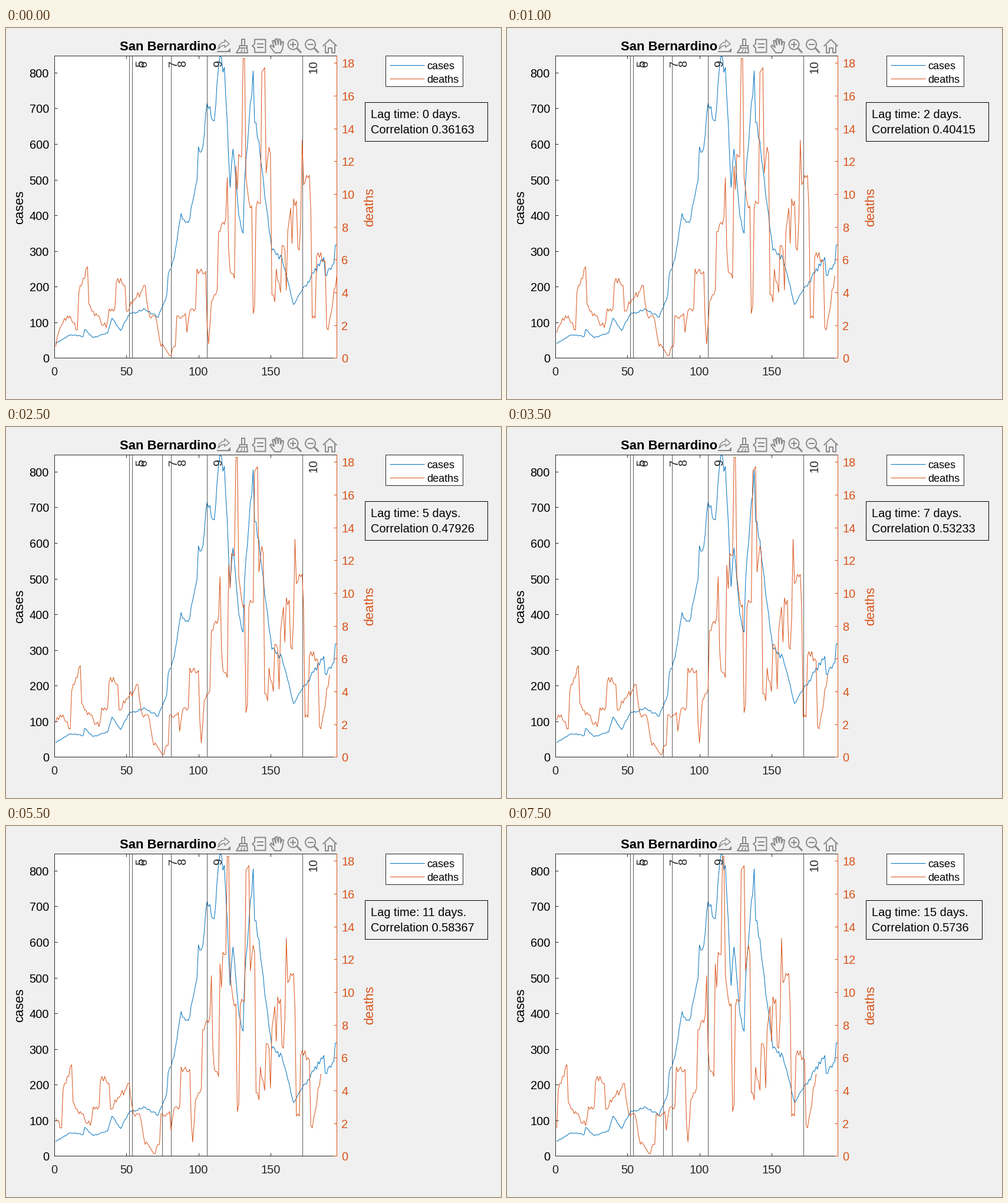
Write a matplotlib script that moves like this. It is 840 px wide and 630 px high and loops after 8000 ms.

```python
import numpy as np
import matplotlib.pyplot as plt
from matplotlib.animation import FuncAnimation
from matplotlib.patches import Circle, Polygon, Rectangle

W, H, DPI = 840, 630, 100
PX = 72 / DPI
DAYS, LAGS = 196, 16
LEFT, TOP, RIGHT, BOTTOM = 82.05, 47.4, 561.27, 560.4
BLUE, ORANGE, DARK, RULE = "#0072bd", "#d95319", "#262626", "#5c5c5c"
BACK, ICON = "#f0f0f0", "#8a8a8a"
CASES_MAX, DEATHS_MAX = 847, 129 / 7

# Turning points by day; seeded wiggles fill the days between.
CASES = {1: 41, 11: 65, 20: 60, 21: 80, 27: 57, 37: 70, 40: 112, 46: 77,
         52: 122, 63: 136, 72: 114, 78: 176, 79: 233, 83: 278, 88: 405,
         93: 380, 99: 497, 100: 592, 103: 590, 106: 715, 111: 665,
         115: 847, 118: 815, 122: 478, 124: 586, 128: 401, 131: 350,
         132: 493, 135: 653, 138: 805, 139: 660, 142: 608, 146: 455,
         151: 302, 158: 278, 166: 150, 187: 282, 188: 232, 194: 265,
         195: 317, 196: 317}
# Weekly death totals: a slow base, plus one-day spikes that each count
# for the seven days they stay in the window.
BASE = {1: 5, 3: 11, 9: 18, 16: 12, 23: 24, 28: 18, 36: 13, 38: 21, 50: 20,
        63: 31, 66: 18, 71: 16, 74: 5, 80: 1, 84: 5, 91: 7, 94: 20, 105: 21,
        107: 6, 109: 24, 119: 38, 122: 10, 126: 7, 128: 39, 132: 36, 136: 20,
        147: 22, 149: 33, 153: 24, 157: 11, 161: 9, 165: 31, 169: 29,
        173: 21, 178: 27, 179: 17, 183: 18, 190: 12, 196: 35}
SPIKES = {17: 15, 43: 12, 85: 12, 99: 16, 114: 22, 120: 27, 126: 48, 131: 44,
          140: 45, 144: 57, 154: 17, 158: 20, 162: 18, 166: 18, 171: 17,
          172: 36, 182: 27}
STAGES = {52: "5", 54: "6", 75: "7", 81: "8", 106: "9", 172: "10"}
CORRELATION = {0: 0.36163, 1: 0.3827, 2: 0.40415, 4: 0.45272, 7: 0.53233,
               9: 0.55839, 11: 0.58367, 13: 0.58816, 15: 0.5736}

plt.rcParams["font.family"] = "Liberation Sans"
rng = np.random.default_rng(4)
days = np.arange(1, DAYS + 1)


def between(keys, x):
    return np.interp(x, list(keys), list(keys.values()))


def wiggle(keys):
    return rng.uniform(-1, 1, DAYS) * ~np.isin(days, list(keys))


cases = between(CASES, days) * (1 + 0.03 * wiggle(CASES))
weekly = between(BASE, days) + 1.5 * wiggle(BASE)
for start, count in SPIKES.items():
    weekly += count * ((days >= start) & (days < start + 7))
deaths = np.clip(np.round(weekly), 1, 129) / 7

fig = plt.figure(figsize=(W / DPI, H / DPI), dpi=DPI, facecolor=BACK)
ax = fig.add_axes([LEFT / W, 1 - BOTTOM / H,
                   (RIGHT - LEFT) / W, (BOTTOM - TOP) / H])
ax2 = ax.twinx()
page = fig.add_axes([0, 0, 1, 1], zorder=5)
page.set(xlim=(0, W), ylim=(H, 0))
page.axis("off")


def label(x, y, s, size=20, color="black", ha="left", **kw):
    return page.text(x, y, s, fontsize=size * PX, color=color, ha=ha,
                     va="baseline", rotation_mode="anchor", **kw)


def stroke(points, width=2, color=ICON):
    page.plot(*zip(*points), color=color, lw=width * PX,
              solid_joinstyle="round", solid_capstyle="butt")


def box(x0, y0, x1, y1, face, edge):
    return page.add_patch(Rectangle((x0, y0), x1 - x0, y1 - y0, fc=face,
                                    ec=edge, lw=PX))


def day_px(d):
    return LEFT + d / DAYS * (RIGHT - LEFT)


def draw_chart():
    ax.set(xlim=(0, DAYS), ylim=(0, CASES_MAX),
           xticks=range(0, 151, 50), yticks=range(0, 801, 100))
    ax2.set(ylim=(0, DEATHS_MAX), yticks=range(0, 19, 2))
    tick = dict(direction="in", length=5 * PX, width=PX,
                labelleft=False, labelright=False, labelbottom=False)
    ax.tick_params(top=True, color=DARK, **tick)
    ax2.tick_params(axis="y", color=ORANGE, **tick)
    for side in ("left", "top", "bottom", "right"):
        ax.spines[side].set(color=DARK, linewidth=PX)
        ax2.spines[side].set(color=ORANGE, linewidth=PX)
        ax2.spines[side].set_visible(side == "right")
    ax.spines["right"].set_visible(False)

    ax.plot(days, cases, color=BLUE, lw=PX)
    for d, name in STAGES.items():
        ax.axvline(d, color=RULE, lw=PX)
        label(day_px(d) + 25, 55, name, color=DARK, ha="right", rotation=90)

    span = BOTTOM - TOP
    for d in range(0, 151, 50):
        label(day_px(d), 590, str(d), color=DARK, ha="center")
    for v in range(0, 801, 100):
        label(73, BOTTOM - v / CASES_MAX * span + 8, str(v), ha="right")
    for v in range(0, 19, 2):
        label(569.5, BOTTOM - v / DEATHS_MAX * span + 8, str(v), color=ORANGE)
    label(29, 304.5, "cases", 22, ha="center", rotation=90)
    label(623, 304.5, "deaths", 22, ORANGE, "center", rotation=90)
    label(193, 38.5, "San Bernardino", 22, weight="bold")


def draw_legend():
    box(644.4, 47.4, 775.4, 99.4, "white", DARK)
    for y, name, color in ((63.4, "cases", BLUE), (86.4, "deaths", ORANGE)):
        stroke([(651, y), (710, y)], 1, color)
        label(714.5, y + 6.5, name, 18)


def draw_toolbar():
    # export
    stroke([(358, 40.4), (381, 40.4)])
    page.add_patch(Polygon([(375, 40), (381, 34), (381, 40)], fc=ICON, lw=0))
    stroke([(360, 36), (362, 29), (366, 25), (371, 24), (371, 20), (379, 27),
            (371, 33), (371, 29), (365, 31), (360, 36)], 1.5)
    # brush
    stroke([(400, 30), (400, 19), (405, 19), (405, 30)])
    stroke([(396, 30), (409, 30), (409, 34), (396, 34), (396, 30)])
    stroke([(396, 34), (391, 42), (410, 42), (409, 34)])
    stroke([(398, 42), (401, 36)], 1.5)
    stroke([(404, 42), (405, 36)], 1.5)
    # data tip
    stroke([(422, 27), (422, 19.4), (440.4, 19.4), (440.4, 41.4),
            (422, 41.4), (422, 34), (418, 30.5), (422, 27)])
    for y in (27, 33):
        stroke([(426, y), (437, y)])
    # hand
    stroke([(456, 42), (448, 31), (450, 29), (455, 33), (452, 22), (455, 21),
            (458, 29), (457, 19), (460, 18), (462, 28), (463, 19), (466, 20),
            (466, 29), (468, 23), (471, 24), (469, 36), (466, 42), (456, 42)])
    # zoom in and out
    for x in (487, 516.5):
        page.add_patch(Circle((x, 28), 8.5, fill=False, ec=ICON, lw=2 * PX))
        stroke([(x + 6.5, 34), (x + 14, 42)], 3)
        stroke([(x - 5, 28), (x + 5, 28)])
    stroke([(487, 23), (487, 33)])
    # home
    stroke([(537.5, 31), (549.5, 19.5), (561.5, 31)])
    stroke([(541.5, 29), (541.5, 42), (546.5, 42), (546.5, 34), (552.5, 34),
            (552.5, 42), (557.5, 42), (557.5, 29)])


draw_chart()
draw_legend()
draw_toolbar()
death_line, = ax2.plot([], [], color=ORANGE, lw=PX)
note = box(609.4, 126.4, 817.4, 192.4, BACK, "black")
lag_text = label(619, 153, "")
corr_text = label(619, 179, "")


def update(lag):
    death_line.set_data(days[:DAYS - lag], deaths[lag:])
    value = f"{between(CORRELATION, lag):.5g}"
    lag_text.set_text(f"Lag time: {lag} days.")
    corr_text.set_text(f"Correlation {value}")
    note.set_width(208 if len(value) == 7 else 197)
    return death_line, lag_text, corr_text, note


anim = FuncAnimation(fig, update, frames=LAGS, interval=500,
                     repeat=True, repeat_delay=0)
plt.show()
```
